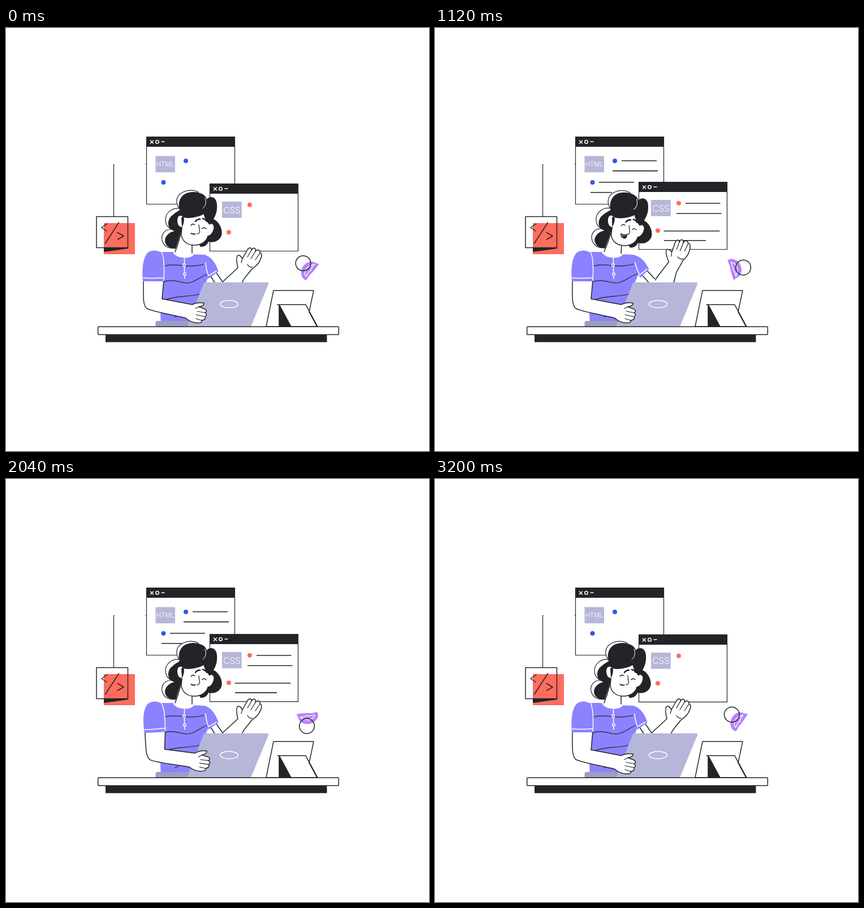
An HTML page that plays this animation: 748 by 748 pixels, repeating every 3240 ms.

```html
<!DOCTYPE html>
<html lang="en">
<head>
<meta charset="utf-8">
<title>Web developer at a desk</title>
<style>
html, body { margin: 0; width: 100%; height: 100%; overflow: hidden; background: #fff; }
svg { display: block; width: 100%; height: 100%; }
text { font-family: Inter, "Open Sans", sans-serif; font-weight: 300; fill: #fff; text-anchor: middle; }
.ink { fill: none; stroke: #222428; stroke-width: 1.5; stroke-linejoin: round; stroke-linecap: round; }
.skin { fill: #fff; stroke: #222428; stroke-width: 1.5; stroke-linejoin: round; }
.thin { stroke-width: 1.2; }
.white { fill: none; stroke: #fff; stroke-width: 1.5; stroke-linecap: round; }
.dark { fill: #222428; }
.shirt { fill: #8c82ff; }
.pale { fill: #b5b6d8; }
.blue { fill: #3256ec; }
.red { fill: #ff6c5e; }
.rows line { stroke: #222428; stroke-width: 1.6; }
</style>
</head>
<body>
<svg viewBox="0 0 748 748">
  <defs>
    <g id="pane">
      <rect class="skin thin" x=".5" y=".5" width="156" height="119"/>
      <path class="dark" d="M0 0H157V18H0Z"/>
      <path class="white" d="M7.5 7L12.5 12M12.5 7L7.5 12M27 9H32"/>
      <circle class="white" cx="19.5" cy="9.2" r="2.8"/>
    </g>
  </defs>

  <!-- hanging card -->
  <rect class="red" x="173" y="345" width="55" height="55"/>
  <path class="dark" d="M173 388H216V390L173 396Z"/>
  <path class="ink" d="M160 333.5H215.5V388.5H160Z"/>
  <path class="ink thin" d="M190.5 333V241.5H191.5M247 241H247.5"/>
  <path class="ink" d="M179 346L169 353L178 359M199.500 344L175.500 381M197 361.500L208 368L197.500 374"/>

  <!-- HTML window -->
  <use href="#pane" x="248" y="192"/>
  <rect class="pale" x="264.500" y="226.500" width="34.500" height="28.700"/>
  <text x="281.800" y="245" font-size="11.300">HTML</text>
  <circle class="blue" cx="318" cy="235" r="4"/>
  <circle class="blue" cx="278.500" cy="273" r="4"/>
  <g class="rows" id="htmlRows"></g>

  <!-- CSS window -->
  <g id="cssPane">
    <use href="#pane" x="360"/>
    <rect class="pale" x="382" y="32" width="34.700" height="28.700"/>
    <text x="399.500" y="52.500" font-size="15.300">CSS</text>
    <circle class="red" cx="431" cy="37.700" r="4"/>
    <circle class="red" cx="394" cy="86.200" r="4"/>
    <g class="rows" id="cssRows"></g>
  </g>

  <!-- orbiting pair -->
  <g id="orbit">
    <path d="M554 417L543 431L537 437L531 446C523 445 520 434 523 426C527 416 535 413 540 413C545 413 549 417 554 417Z" fill="#b685fa"/>
    <path class="white" style="stroke-width:1.3" d="M530 439C526 431 531 421 545 418M545 419C538 423 542 429 536 431C533 433 534 437 530 439"/>
    <circle class="ink" cx="525.500" cy="416" r="13.300"/>
  </g>

  <!-- head -->
  <g id="head">
    <path class="skin thin" d="M340 290C323 282 300 291 302 309Q303 315 306 319C293 318 282 327 282 339Q282 350 292 356C280 356 274 366 276 375C279 387 289 391 300 389L320 340Z"/>
    <path class="dark" d="M307 322C303 309 308 291 329 290C344 289 354 296 355 303C359 297 372 296 373 312C374 323 371 331 367 338C378 343 384 358 381 367C377 377 368 380 358 378C355 385 350 387 344 387L328 360L302 390C288 392 278 382 282 371Q287 361 298 359C286 356 284 343 291 334Q298 327 307 322Z"/>
    <path fill="#fff" d="M309 362L298 397L310 412L330 407V383Z"/>
    <path class="ink" d="M309 364Q305 381 299 396M329 384V398"/>
    <path class="skin" d="M314 334C323 337 341 334 350 328C351 336 356 342 360 347C363 343 369 347 368 354C367 362 361 368 357 368C355 377 346 384 333 384C321 384 311 377 310 365L311 353C302 352 300 338 305 332Q310 329 314 334Z"/>
    <path class="dark" d="M314 333Q317 341 311 353L310 335Z"/>
    <path class="white" style="stroke-width:1" d="M352 301C355 309 353 315 348 319"/>
    <path class="ink" d="M335 342Q338 338 343 338M348 337Q353 338 355 342" style="stroke-width:2.6"/>
    <path class="ink" d="M327 349Q330 345 334 348M347 355Q350 351 354 355M341 348L342 357Q344 363 338 364" style="stroke-width:1.300"/>
    <path class="skin" id="mouth"/>
    <path class="dark" id="mouthInside"/>
  </g>

  <!-- torso -->
  <path class="shirt" d="M272 396L296 396C303 408 325 408 331 400L352 401Q364 406 366 418L357 442L320 528H274L273 503L278 450Z"/>
  <path class="ink thin" d="M279 421C304 414 322 427 353 417M276 450C294 442 308 451 321 451C336 450 344 438 358 435M284 480C304 473 322 476 346 470M299 511Q307 505 320 503"/>
  <path class="white" d="M296 397C304 408 325 408 332 400M315.500 406V416M315.500 422V432M316 438V443"/>
  <g class="white"><circle cx="315" cy="419" r="2.200"/><circle cx="316" cy="435" r="2.200"/></g>

  <!-- waving arm -->
  <g id="forearm">
    <path class="skin" d="M383 449L410 424C408 416 407 407 409 403C411 400 416 403 418 408L427 392C430 387 435 388 434 393C437 387 443 389 441 395C445 390 450 393 449 398C454 398 452 406 449 411C447 418 440 422 434 427C428 436 421 441 418 449L400 490L370 470Z"/>
    <path class="ink thin" d="M434 393L427 405M441 395L433 408M449 398L441 410M418 408L416 415M427 418Q430 424 436 423"/>
  </g>
  <g id="upperArm">
    <path fill="#fff" d="M360 438L372 432L383 449L388 470H382L365 443Z"/>
    <path class="ink" d="M372 433L383 449M362 439L372 455"/>
    <path class="shirt" d="M350 402C362 402 372 417 375.500 431L358 443L350 420Z"/>
    <path class="white" d="M353 415Q354 428 358 438L372 430"/>
  </g>

  <!-- desk and laptop -->
  <path d="M267 518H326V528H264.500V520Z" fill="#9c9dc0"/>
  <path class="pale" d="M353 449.700H462Q465 449.700 464 453L433 528H320L349 453Q350 449.700 353 449.700Z"/>
  <ellipse class="white" cx="394.500" cy="488.300" rx="16" ry="6.500"/>
  <path class="skin" d="M460 528L473 464.300H544L536 502L550 528Z"/>
  <path class="dark" d="M483 489L504 528H483Z"/>
  <path class="ink" d="M480 489.300H530L551 528M483 489L504 528M483 489V528"/>
  <rect class="skin" x="162.700" y="528.300" width="425.600" height="14" rx="1"/>
  <rect class="dark" x="176" y="543" width="391.500" height="12.500"/>

  <!-- typing arm -->
  <g id="typingArm">
    <path class="skin" d="M243 446L243 474Q243 491 249 496C261 502 290 506 318 513Q325 520 337 521.500Q348 522 346 517Q354 516 352 510.500Q357 507 352 503.500Q357 501 352 497L341 493Q351 491 350 486.500Q340 484 329 489L276 479L279 446Z"/>
    <path class="ink thin" d="M346 517L336 514M352 510.500L336 507M352 503.500L338 501M341 493L335 496"/>
    <path class="shirt" d="M242 448C240 425 242 406 251 397C262 390 276 394 279 405Q282 426 279.500 448Z"/>
    <path class="white" d="M275 396C281 408 280 430 279 446M243 442Q261 443 279 441.500"/>
  </g>
</svg>
<script>
const LOOP = 3240, STEP = 40;
const el = id => document.getElementById(id);
const clamp = v => Math.min(1, Math.max(0, v));
const ease = v => (1 - Math.cos(Math.PI * clamp(v))) / 2;
const ramp = (t, from, to) => ease((t - from) / (to - from));

// x1, x2, y, start time
function makeRows(id, specs) {
  return specs.map(([x1, x2, y, start]) => {
    const node = document.createElementNS("http://www.w3.org/2000/svg", "line");
    const attrs = { x1, x2: x1, y1: y, y2: y };
    for (const key in attrs) node.setAttribute(key, attrs[key]);
    el(id).append(node);
    return { node, x1, x2, start };
  });
}

const rows = [
  ...makeRows("htmlRows", [[330, 392, 234.8, 40], [314, 394, 252.6, 300], [290, 352, 272.8, 420], [275, 313, 290.8, 620]]),
  ...makeRows("cssRows", [[443, 504.5, 38, 20], [427, 506.5, 56, 100], [404.5, 503.5, 87, 180], [405, 479, 103.8, 260]])
];

// Eased bobbing with one key per quarter of the loop
const bobKeys = [275, 267.7, 281.2, 267.7, 275];
function bob(t) {
  const pos = t / LOOP * 4, i = Math.floor(pos);
  return bobKeys[i] + (bobKeys[i + 1] - bobKeys[i]) * ease(pos - i);
}

const move = (id, value) => el(id).setAttribute("transform", value);

function draw(t) {
  const wave = ease(1 - Math.abs(t - 1200) / 800);
  const typing = ramp(t, 0, 640) - ramp(t, 720, 1120) + ramp(t, 1720, 2320) - ramp(t, 2440, 3200);

  for (const { node, x1, x2, start } of rows) {
    const grown = ramp(t, start, start + 400) * (1 - ramp(t, 2800, 3180));
    node.setAttribute("x2", x1 + (x2 - x1) * grown);
  }

  move("cssPane", `translate(0 ${bob(t)})`);
  move("orbit", `rotate(${t / LOOP * 360} 533.3 425)`);
  move("head", `rotate(${2.7 * wave} 315 400)`);
  move("forearm", `translate(${0.5 * wave} ${-14 * wave}) rotate(${-10 * wave} 430 408)`);
  move("upperArm", `rotate(${-9 * wave} 350 410)`);
  move("typingArm", `rotate(${-6.3 * typing} 263 403)`);

  const open = Math.sqrt(wave);
  const right = 335 + 3 * open;
  el("mouth").setAttribute("d", `M327 363Q332 ${365 + open} ${right} 364Q${right - 1} ${365 + 8 * open} 332 ${364.7 + 6 * open}Q328 ${365 + 5 * open} 327 363Z`);
  el("mouthInside").setAttribute("d", `M328 ${364 + 2 * open}L${right} ${364 + 2 * open}Q${right - 1} ${365 + 7 * open} 332 ${364 + 6 * open}Z`);
}

const origin = performance.now();
function tick() {
  const t = (performance.now() - origin) % LOOP;
  draw(Math.floor(t / STEP) * STEP);
  requestAnimationFrame(tick);
}
tick();
</script>
</body>
</html>
```
